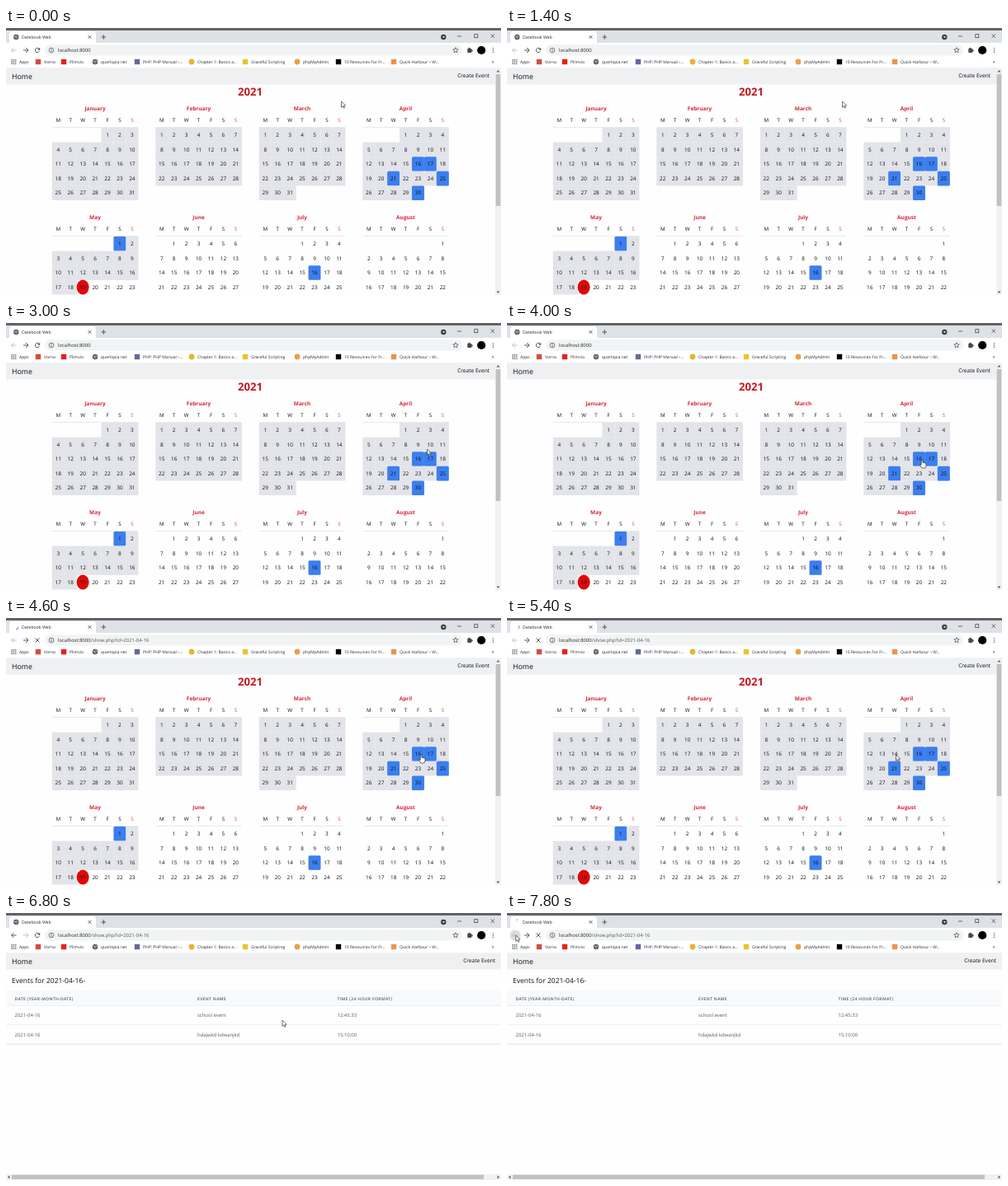
These frames come from a looping animation (600 px wide and 324 px high, 8000 ms). An HTML page with a canvas:

```html
<!DOCTYPE html>
<html lang="en">
<head>
<meta charset="utf-8">
<title>Datebook Web</title>
<style>
html, body { margin: 0; width: 100%; height: 100%; overflow: hidden; background: #fff; }
canvas { display: block; width: 600px; height: 324px; }
</style>
</head>
<body>
<canvas id="stage"></canvas>
<script>
const W = 600, H = 324, LOOP = 8000, STEP = 200;
const FONT = '"Open Sans", "Noto Sans", sans-serif';
const INK = '#0d1013', ICON = '#45494e', DISABLED = '#babcbe', LABEL = '#26292d', MUTED = '#565c66';
const RED = '#d92638', BLUE = '#3c7eee', PAST = '#e2e4e9', RULE = '#dee2e6';

const LOAD_START = 4600, PAGE_SHOWN = 5600, BACK_HOVER = 7600, BACK_CLICK = 7800;

// time, x, y of the pointer tip
const PATH = [
  [0, 406.5, 89], [2000, 406.5, 89], [2800, 510.5, 153], [3400, 510.5, 153],
  [3800, 503, 166], [5000, 503, 166], [5400, 471.5, 166], [5600, 416, 156],
  [6600, 416, 156], [7600, 10.8, 27], [8000, 10.8, 27]
];

const canvas = document.getElementById('stage');
const c = canvas.getContext('2d');
const dpr = window.devicePixelRatio || 1;
canvas.width = W * dpr;
canvas.height = H * dpr;
c.scale(dpr, dpr);
c.textRendering = 'geometricPrecision';

function rect(x, y, w, h, color, r = 0) {
  c.fillStyle = color;
  c.beginPath();
  c.roundRect(x, y, w, h, r);
  c.fill();
}

function oval(x, y, rx, color, ry = rx) {
  c.fillStyle = color;
  c.beginPath();
  c.ellipse(x, y, rx, ry, 0, 0, Math.PI * 2);
  c.fill();
}

function trace(points, close) {
  c.beginPath();
  points.forEach(([x, y], i) => i ? c.lineTo(x, y) : c.moveTo(x, y));
  if (close) c.closePath();
}

function line(points, color = ICON, width = 0.9) {
  trace(points);
  c.strokeStyle = color;
  c.lineWidth = width;
  c.stroke();
}

function arc(x, y, r, from, to, color, width = 0.9) {
  c.beginPath();
  c.arc(x, y, r, from, to);
  c.strokeStyle = color;
  c.lineWidth = width;
  c.stroke();
}

function cross(x, y, r, color = ICON, width = 0.9) {
  line([[x - r, y - r], [x + r, y + r]], color, width);
  line([[x - r, y + r], [x + r, y - r]], color, width);
}

// y is the middle of the capital height
function text(s, x, y, size, { color = INK, weight = 400, align = 'left', spacing = 0 } = {}) {
  c.font = `${weight} ${size}px ${FONT}`;
  c.letterSpacing = spacing + 'px';
  c.textAlign = align;
  c.fillStyle = color;
  c.fillText(s, x, y + size * 0.357);
}

function globe(x, y) {
  oval(x, y, 3.2, '#55595e');
  line([[x - 2.4, y - 0.9], [x - 0.3, y - 0.4], [x + 0.2, y + 1.9]], '#e8eaed', 0.8);
  line([[x + 0.5, y - 2.2], [x + 2.2, y + 0.4]], '#e8eaed', 0.7);
}

function arrow(x, y, dir, enabled) {
  const color = enabled ? ICON : DISABLED;
  line([[x - 3, y], [x + 3, y]], color);
  line([[x, y - 3], [x + 3 * dir, y], [x, y + 3]], color);
}

function tabStrip(t, loading) {
  rect(0, 0, W, 18, '#dee1e6');
  rect(0, 0, W, 3, '#656267');
  rect(4, 4, 105, 15, '#fff', [4, 4, 0, 0]);
  if (loading) {
    const back = t >= BACK_CLICK;
    const a = back ? -1.9 : (t - LOAD_START) / 1000 * 7;
    arc(12, 11, 2.8, a, a + (back ? 0.6 : 1.6), back ? '#a8787c' : '#3b78e7');
  } else {
    globe(12.3, 11);
  }
  text('Datebook Web', 19, 11, 5.2, { color: LABEL });
  cross(101.5, 11, 1.8);
  line([[115.5, 11], [121, 11]]);
  line([[118.25, 8.2], [118.25, 13.8]]);
  oval(530.3, 11, 3.2, '#3c4043');
  trace([[529, 10.2], [532, 10.2], [530.5, 12.2]], true);
  c.fillStyle = '#fff';
  c.fill();
  line([[547, 10], [552, 10]], '#333', 0.7);
  c.strokeStyle = '#333';
  c.strokeRect(567.8, 7.7, 4, 4);
  cross(589.8, 9.7, 2.2, '#333', 0.7);
}

function toolbar(t, loading, path) {
  const onEvents = t >= PAGE_SHOWN && t < BACK_CLICK;
  rect(0, 18, W, 30.5, '#fff');
  if (t >= BACK_HOVER) oval(10, 27, 6.6, '#dcdde0');
  arrow(9.5, 27, -1, onEvents);
  arrow(24, 27, 1, !onEvents);
  if (loading) {
    cross(38, 27, 2.5);
  } else {
    arc(38, 27, 2.7, 0.4, 5.6, ICON);
    trace([[41.2, 23.8], [41.2, 26.8], [38.2, 26.8]], true);
    c.fillStyle = ICON;
    c.fill();
  }
  rect(47, 20.3, 506, 13.2, '#f1f3f4', 6.6);
  arc(55, 27, 2.9, 0, 7, ICON, 0.7);
  line([[55, 26.4], [55, 28.7]], ICON, 0.8);
  rect(54.6, 25, 0.8, 0.8, ICON);
  const host = 'localhost:8000';
  text(host, 63, 27, 5.9, { color: LABEL });
  text(path, 63 + c.measureText(host).width, 27, 5.9, { color: '#54585d' });

  const star = [...Array(10).keys()].map(i => {
    const a = -Math.PI / 2 + i * Math.PI / 5, r = i % 2 ? 1.5 : 3.4;
    return [545 + r * Math.cos(a), 27 + r * Math.sin(a)];
  });
  star.push(star[0]);
  line(star, ICON, 0.7);
  rect(559.3, 25, 4.9, 4.9, ICON, 0.6);
  oval(561.5, 24.9, 1.2, ICON);
  oval(564.5, 27.4, 1.2, ICON);
  oval(576.2, 27, 5.1, '#000');
  for (const y of [24.6, 27, 29.4]) oval(590.5, y, 0.65, ICON);
}

const BOOKMARKS = [
  [46, 'Vorna', '#d84a3f'], [77, 'Plimvio', '#e8201b'], [115, 'querlopia.net', 'globe'],
  [166, 'PHP: PHP Manual –...', '#62699f'], [232, 'Chapter 1: Basics a...', '#e5b62f', true],
  [297, 'Graceful Scripting', '#e6c52c'], [360, 'phpMyAdmin', '#e9a04a', true],
  [410, '10 Resources For Fr...', '#000'], [477, 'Quick Harbour – W...', '#ee9248']
];

function bookmarks() {
  const dots = ['#dd5044', '#3c7de0', '#2d9a58'];
  for (let i = 0; i < 9; i++) {
    rect(6.3 + i % 3 * 2.3, 38 + Math.floor(i / 3) * 2.3, 1.5, 1.5, dots[(i + Math.floor(i / 3)) % 3]);
  }
  text('Apps', 16, 41, 5, { color: LABEL });
  for (const [x, label, color, round] of BOOKMARKS) {
    if (color === 'globe') globe(x - 7, 41);
    else if (round) oval(x - 7, 41, 3.4, color);
    else rect(x - 10.2, 37.8, 6.4, 6.4, color);
    text(label, x, 41, 5, { color: LABEL });
  }
  text('»', 590, 40.5, 6.5, { color: ICON, align: 'center' });
}

function navbar(right) {
  rect(0, 48.5, W, 20, '#eef0f2');
  rect(0, 48.2, W, 0.6, '#d9dce0');
  text('Home', 7, 59.2, 8.8);
  text('Create Event', right, 58, 6.6, { align: 'right' });
}

// name, weekday of day 1 (Monday = 0), number of days, days with events
const MONTHS = [
  ['January', 4, 31, []], ['February', 0, 28, []], ['March', 0, 31, []],
  ['April', 3, 30, [16, 17, 21, 25, 30]], ['May', 5, 31, [1]], ['June', 1, 30, []],
  ['July', 3, 31, [16]], ['August', 6, 31, []]
];
const CELL = 14.93, ROW = 17.6, TODAY = { month: 4, day: 19 };

function month(index) {
  const [name, first, days, events] = MONTHS[index];
  const x0 = 55.8 + index % 4 * 125.5, y0 = Math.floor(index / 4) * 132;
  text(name, x0 + 52.2, y0 + 97.2, 6.5, { color: RED, weight: 700, align: 'center' });
  [...'MTWTFSS'].forEach((d, i) => {
    text(d, x0 + (i + 0.5) * CELL, y0 + 111.7, 6.2, { color: i === 6 ? '#d84b50' : INK, align: 'center' });
  });
  rect(x0, y0 + 119.9, CELL * 7, 0.8, RULE);
  for (let day = 1; day <= days; day++) {
    const slot = first + day - 1;
    const x = x0 + slot % 7 * CELL, y = y0 + 121 + Math.floor(slot / 7) * ROW;
    if (y > H) break;
    const past = index < TODAY.month || index === TODAY.month && day < TODAY.day;
    if (past) rect(x, y, CELL + 0.1, ROW + 0.1, PAST);
    if (events.includes(day)) rect(x, y, CELL, ROW, BLUE, 1.5);
    if (index === TODAY.month && day === TODAY.day) oval(x + CELL / 2, y + ROW / 2, 7.5, '#e00808', 9);
    text(String(day), x + CELL / 2, y + ROW / 2, 6.4, { align: 'center' });
  }
}

function triangle(x, y, dx, dy) {
  trace([[x + dx * 1.5, y + dy * 1.5], [x - dx + dy * 2, y - dy + dx * 2], [x - dx - dy * 2, y - dy - dx * 2]], true);
  c.fillStyle = '#606060';
  c.fill();
}

function calendarPage() {
  navbar(586);
  text('2021', 296, 77, 13.1, { color: '#c5161d', weight: 700, align: 'center' });
  MONTHS.forEach((_, i) => month(i));
  rect(593, 48.5, 7, H - 48.5, '#f1f1f1');
  rect(593.7, 56, 5.6, 160, '#c1c1c1');
  triangle(596.5, 52.5, 0, -1);
  triangle(596.5, 320.5, 0, 1);
}

const COLUMNS = [10.5, 232, 401.5];
const HEADINGS = ['DATE (YEAR-MONTH-DATE)', 'EVENT NAME', 'TIME (24 HOUR FORMAT)'];
const EVENTS = [
  ['2021-04-16', 'school event', '12:45:33'],
  ['2021-04-16', 'hdajwkd kdwanjkd', '15:10:00']
];

function eventsPage() {
  navbar(593);
  text('Events for 2021-04-16-', 7, 82, 8.5);
  rect(0, 94, W, 18.5, '#f8f9fa');
  HEADINGS.forEach((s, i) => text(s, COLUMNS[i], 103.8, 5.05, { color: MUTED, weight: 600, spacing: 0.33 }));
  rect(0, 112, W, 0.7, '#e9ebee');
  EVENTS.forEach((row, r) => {
    row.forEach((s, i) => text(s, COLUMNS[i], 124.3 + r * 23.3, 5.95, { color: MUTED }));
  });
  rect(0, 135.3, W, 0.7, '#eaecef');
  rect(0, 158.5, W, 1, '#dfe1e4');
  rect(0, 159.5, W, 1, '#f4f5f6');
  rect(0, 317, W, 7, '#f1f1f1');
  rect(7, 317.7, 572, 5.4, '#c1c1c1');
  triangle(3.4, 320.4, -1, 0);
  triangle(596.6, 320.4, 1, 0);
}

function pointerAt(t) {
  const i = PATH.findIndex(p => p[0] > t);
  const [t0, x0, y0] = PATH[i - 1], [t1, x1, y1] = PATH[i];
  const k = (t - t0) / (t1 - t0);
  return [x0 + (x1 - x0) * k, y0 + (y1 - y0) * k];
}

const ARROW = [[0, 0], [0, 7.2], [1.7, 5.7], [2.9, 8.2], [4, 7.7], [3, 5.2], [5.1, 5.1]];
const HAND = [[-0.8, 0.4], [0, 0], [0.8, 0.5], [0.9, 3.2], [4.5, 4.2], [5.1, 5.1], [4.8, 7.6],
  [3.8, 10], [-0.2, 10], [-2.6, 6.3], [-2.2, 5.6], [-0.8, 6.4]];

function pointer(t) {
  const [x, y] = pointerAt(t);
  const hand = t >= 3800 && t <= 5000;
  c.save();
  c.translate(x, y);
  trace(hand ? HAND : ARROW, true);
  c.fillStyle = '#fff';
  c.fill();
  c.strokeStyle = '#333';
  c.lineWidth = 0.7;
  c.lineJoin = 'round';
  c.stroke();
  c.restore();
}

function draw(t) {
  const loading = t >= LOAD_START && t < PAGE_SHOWN || t >= BACK_CLICK;
  rect(0, 0, W, H, '#fefefe');
  if (t < PAGE_SHOWN) calendarPage();
  else eventsPage();
  tabStrip(t, loading);
  toolbar(t, loading, t >= LOAD_START ? '/show.php?id=2021-04-16' : '');
  bookmarks();
  pointer(t);
}

function tick() {
  draw(Math.floor(performance.now() % LOOP / STEP) * STEP);
  requestAnimationFrame(tick);
}
tick();
</script>
</body>
</html>
```
